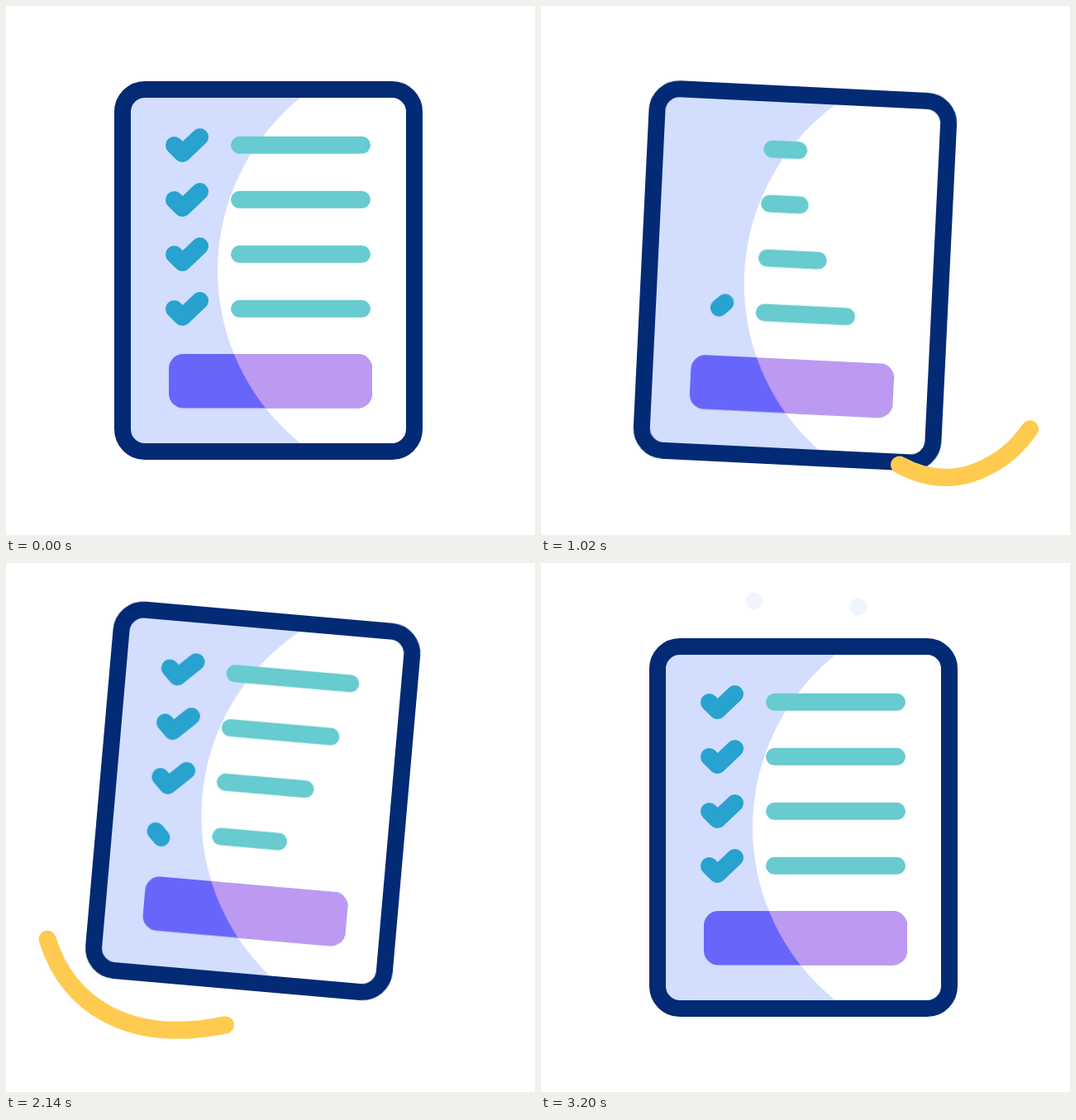
An HTML page without scripts for the animation above (3420 ms loop, 640 px wide and 640 px high).

```html
<!DOCTYPE html>
<html lang="en">
<head>
<meta charset="utf-8">
<title>Checklist</title>
<style>
html, body { margin: 0; width: 100%; height: 100%; overflow: hidden; background: #fff; }
svg { display: block; width: 100%; height: 100%; }

/* Every part shares one clock; --d shifts a part along it. */
.bob, .tilt, .row, .tick, .swoosh, .puff {
  animation: 3420ms cubic-bezier(.37, 0, .63, 1) var(--d, 0ms) infinite both;
}
.bob { animation-name: bob; }
.tilt { animation-name: tilt; transform-origin: 141px 103px; }
.row { animation-name: row; stroke: #67cbd0; }
.tick { animation-name: tick; stroke: #28a2cf; }
.tick.slow { animation-name: tick-slow; }
.swoosh { animation-name: swoosh; stroke: #fecb50; stroke-width: 20.5; }
.puff { animation-name: puff-a; stroke: #eff4fd; stroke-width: 22; }
.puff.late { animation-name: puff-b; }
.pen { fill: none; stroke-width: 21; stroke-linecap: round; stroke-linejoin: round; }

@keyframes bob {
  0%, 8.772% { transform: translate(0, 0); }
  20.906% { transform: translate(.7px, -48px); }
  39.035% { transform: translate(.7px, 46px); }
  60.526% { transform: translate(.7px, -48px); }
  79.825%, 100% { transform: translate(0, 0); }
}
@keyframes tilt {
  0%, 11.111% { transform: rotate(0deg); }
  24.123% { transform: rotate(5deg); }
  42.398% { transform: rotate(-5deg); }
  63.158% { transform: rotate(5deg); }
  83.187%, 100% { transform: rotate(0deg); }
}
@keyframes row {
  0%, 5.848% { stroke-dasharray: 148 300; }
  28.07%, 36.257% { stroke-dasharray: 32 300; }
  67.836%, 100% { stroke-dasharray: 148 300; }
}
/* Wiped from the short end, then drawn again from there. */
@keyframes tick {
  0%, 5.848% { stroke-dasharray: 100 200; stroke-dashoffset: 0; opacity: 1; }
  12.573% { stroke-dasharray: 100 200; stroke-dashoffset: -99.9; opacity: 1; }
  12.58% { stroke-dasharray: 100 200; stroke-dashoffset: -99.9; opacity: 0; }
  12.6%, 43.85% { stroke-dasharray: 0 200; stroke-dashoffset: 0; opacity: 0; }
  43.86% { stroke-dasharray: 0 200; stroke-dashoffset: 0; opacity: 1; }
  53.51%, 100% { stroke-dasharray: 100 200; stroke-dashoffset: 0; opacity: 1; }
}
@keyframes tick-slow {
  0%, 21.053% { stroke-dasharray: 100 200; stroke-dashoffset: 0; opacity: 1; }
  33.918% { stroke-dasharray: 100 200; stroke-dashoffset: -99.9; opacity: 1; }
  33.92% { stroke-dasharray: 100 200; stroke-dashoffset: -99.9; opacity: 0; }
  33.94%, 54.32% { stroke-dasharray: 0 200; stroke-dashoffset: 0; opacity: 0; }
  54.327% { stroke-dasharray: 0 200; stroke-dashoffset: 0; opacity: 1; }
  79.298%, 100% { stroke-dasharray: 100 200; stroke-dashoffset: 0; opacity: 1; }
}
@keyframes swoosh {
  0%, 12.39% { stroke-dasharray: 0 200; stroke-dashoffset: 0; opacity: 0; }
  12.4% { stroke-dasharray: 0 200; stroke-dashoffset: 0; opacity: 1; }
  25.44%, 25.585% { stroke-dasharray: 100 200; stroke-dashoffset: 0; opacity: 1; }
  35.819% { stroke-dasharray: 100 200; stroke-dashoffset: -99.9; opacity: 1; }
  35.83%, 100% { stroke-dasharray: 100 200; stroke-dashoffset: -99.9; opacity: 0; }
}
@keyframes puff-a {
  0%, 78.94% { stroke-dasharray: 0 200; stroke-dashoffset: 0; opacity: 0; }
  78.95% { stroke-dasharray: 0 200; stroke-dashoffset: 0; opacity: 1; }
  85.38% { stroke-dasharray: 100 200; stroke-dashoffset: 0; opacity: 1; }
  93.567%, 100% { stroke-dasharray: 100 200; stroke-dashoffset: -99.9; opacity: 1; }
}
@keyframes puff-b {
  0%, 83.91% { stroke-dasharray: 0 200; stroke-dashoffset: 0; opacity: 0; }
  83.92% { stroke-dasharray: 0 200; stroke-dashoffset: 0; opacity: 1; }
  88.3% { stroke-dasharray: 100 200; stroke-dashoffset: 0; opacity: 1; }
  93.567%, 100% { stroke-dasharray: 100 200; stroke-dashoffset: -99.9; opacity: 1; }
}
</style>
</head>
<body>
<svg viewBox="0 0 640 640">
  <defs>
    <clipPath id="page"><rect x="141" y="101" width="353" height="438" rx="27"/></clipPath>
    <clipPath id="button"><rect x="197" y="421" width="246" height="65.5" rx="17.5"/></clipPath>
    <circle id="disc" cx="524" cy="320" r="268"/>
    <path id="check" d="M203.5 168.5L213.5 178.5L234.5 158.5" pathLength="100"/>
    <path id="bar" d="M282.5 168.3H430.5" pathLength="148"/>
  </defs>

  <path class="pen puff" pathLength="100" d="M172 78Q210 52 258 46"/>
  <path class="pen puff late" pathLength="100" d="M296 32Q346 32 384 53"/>

  <g class="bob"><g class="tilt">
    <g clip-path="url(#page)">
      <rect x="141" y="101" width="353" height="438" fill="#d3ddfd"/>
      <use href="#disc" fill="#fff"/>
    </g>
    <g clip-path="url(#button)">
      <rect x="197" y="421" width="246" height="66" fill="#6865fa"/>
      <use href="#disc" fill="#bc9af2"/>
    </g>
    <rect x="141" y="101" width="353" height="438" rx="27" fill="none" stroke="#022a75" stroke-width="20"/>
    <g class="pen">
      <use href="#bar" class="row"/>
      <use href="#bar" y="66" class="row" style="--d:160ms"/>
      <use href="#bar" y="132" class="row" style="--d:320ms"/>
      <use href="#bar" y="198" class="row" style="--d:480ms"/>
      <use href="#check" class="tick"/>
      <use href="#check" y="66" class="tick" style="--d:120ms"/>
      <use href="#check" y="132" class="tick" style="--d:240ms"/>
      <use href="#check" y="198" class="tick slow"/>
    </g>
  </g></g>

  <path class="pen swoosh" pathLength="100" d="M618 412C630 460 593 523 556 548C535 562 512 570.5 490 570.5C469 570.5 451 564.5 433.5 555"/>
  <path class="pen swoosh" pathLength="100" style="--d:1322ms" d="M50 455C75 535 150 586 274 557"/>
</svg>
</body>
</html>
```
